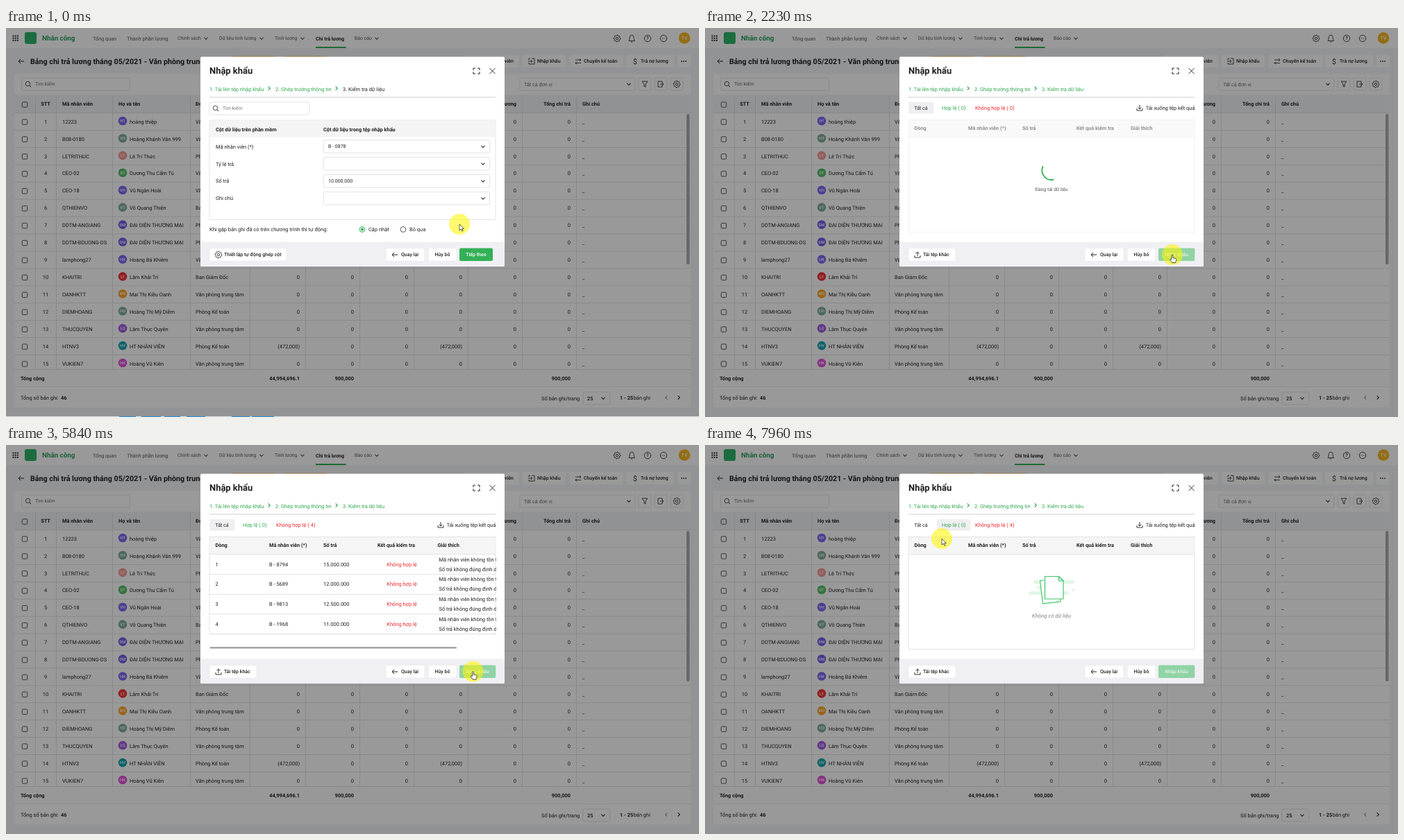
An HTML page that plays this animation: 998x561 px, repeating every 8000 ms.

```html
<!DOCTYPE html>
<html lang="vi">
<head>
<meta charset="utf-8">
<style>
html,body{margin:0;width:100%;height:100%;overflow:hidden;background:#fff}
svg{display:block;width:998px;height:561px}
text{font-family:Roboto,"Noto Sans",sans-serif;text-rendering:geometricPrecision;white-space:pre}
</style>
</head>
<body>
<svg id="stage" viewBox="0 0 998 561" xmlns="http://www.w3.org/2000/svg"></svg>
<script>
const INK = '#212121', GREEN = '#2fa84f', RED = '#f0282d', LINE = '#dcdcde';

// y is the vertical middle of the capitals
const text = (x, y, s, o = {}) => {
  const { size = 7.48, w = 400, fill = INK, anchor = 'start', extra = '' } = o;
  return `<text x="${x}" y="${(y + size * .355).toFixed(2)}" font-size="${size}" font-weight="${w}" fill="${fill}" text-anchor="${anchor}" ${extra}>${s}</text>`;
};
const bold = (x, y, s, o = {}) => text(x, y, s, { w: 700, size: 7.36, ...o });
const rect = (x, y, w, h, fill, o = '') => `<rect x="${x}" y="${y}" width="${w}" height="${h}" fill="${fill}" ${o}/>`;
const box = (x, y, w, h, stroke = LINE, fill = '#fff') => rect(x, y, w, h, fill, `rx="1.5" stroke="${stroke}" stroke-width=".8"`);
const path = (d, stroke = '#333', w = .9, fill = 'none') => `<path d="${d}" fill="${fill}" stroke="${stroke}" stroke-width="${w}" stroke-linejoin="round"/>`;
const circle = (x, y, r, fill = 'none', stroke = 'none', w = .9, o = '') => `<circle cx="${x}" cy="${y}" r="${r}" fill="${fill}" stroke="${stroke}" stroke-width="${w}" ${o}/>`;
const group = (id, body, o = '') => `<g id="${id}" ${o}>${body}</g>`;

const chevron = (x, y, c = '#333') => path(`M${x - 2.6} ${y - 1.3}l2.6 2.6 2.6-2.6`, c, 1.1);
const chevronRight = (x, y, c = '#333', s = 1) => path(`M${x - 1.3 * s} ${y - 2.6}l${2.6 * s} 2.6 ${-2.6 * s} 2.6`, c, 1.1);
const arrowLeft = (x, y) => path(`M${x + 4} ${y}h-8m3.2-3.2l-3.2 3.2 3.2 3.2`, '#222', 1);
const search = (x, y) => circle(x - .6, y - .6, 3.2, 'none', '#333') + path(`M${x + 1.8} ${y + 1.8}l2.4 2.4`, '#333', 1);
const gear = (x, y) => {
  const pts = Array.from({ length: 32 }, (_, i) => {
    const r = i % 4 < 2 ? 5 : 3.9, a = i * Math.PI / 16;
    return (x + r * Math.cos(a)).toFixed(1) + ' ' + (y + r * Math.sin(a)).toFixed(1);
  });
  return path('M' + pts.join('L') + 'Z') + circle(x, y, 1.7, 'none', '#333');
};
const tray = (x, y, dir) => path(`M${x - 4} ${y + 1}v3h8v-3M${x} ${y + 2}v-6` +
  (dir > 0 ? 'm-2.4 3.6l2.4 2.4 2.4-2.4' : 'm-2.4 2.4l2.4-2.4 2.4 2.4'), '#333', 1);

function header() {
  let s = rect(0, 0, 998, 29, '#fff');
  for (let i = 0; i < 9; i++) s += rect(9.5 + i % 3 * 3.2, 10.5 + (i / 3 | 0) * 3.2, 2, 2, '#333');
  s += rect(27, 6, 17, 17, '#2fb36b', 'rx="3"') + bold(52, 14.5, 'Nhân công', { size: 9.8, fill: '#2a9d5c' });
  s += text(125, 15, 'Tổng quan', { size: 7.3, fill: '#555' }) + text(174, 15, 'Thành phần lương', { size: 7.4, fill: '#555' });
  [[247, 'Chính sách', 288], [307, 'Dữ liệu tính lương', 368], [387, 'Tính lương', 427], [502, 'Báo cáo', 534]]
    .forEach(([x, label, c]) => s += text(x, 15, label, { size: 6.85, fill: '#555' }) + chevron(c, 15, '#555'));
  s += bold(446, 15, 'Chi trả lương', { size: 7.1 }) + rect(446, 27, 43.5, 2, '#2fb053');
  s += gear(880, 15) + path('M897 18.5h8.4c-1.4-1.5-1-4.4-1.4-6q-.6-2.3-2.8-2.3t-2.8 2.3c-.4 1.6 0 4.5-1.4 6ZM900 19.8q1.2 1 2.4 0');
  s += circle(924, 15, 4.7, 'none', '#333') + text(924, 15, '?', { size: 7, anchor: 'middle', w: 500 });
  s += circle(947, 15, 4.7, 'none', '#333');
  for (const d of [-2, 0, 2]) s += circle(947 + d, 15, .6, '#333');
  return s + circle(977, 14.5, 8.3, '#f5b51c') + text(977, 14.7, 'TV', { size: 7, anchor: 'middle', fill: '#fff', w: 500 });
}

function titleBar() {
  let s = arrowLeft(22, 48) + bold(35, 48, 'Bảng chi trả lương tháng 05/2021 - Văn phòng trung tâm', { size: 10.7 });
  s += rect(325, 40.4, 64, 16, '#ffc670', 'rx="2"') + rect(399, 40.4, 64, 16, '#ffc670', 'rx="2"');
  [[660, 79], [744, 62], [812, 77], [893, 69], [967, 19]].forEach(([x, w]) => s += rect(x, 39, w, 18, '#fff', 'rx="2"'));
  const label = (x, t, o) => text(x, 48, t, { size: 7, w: 500, ...o });
  s += label(731, 'Thêm nhân viên', { anchor: 'end' }) + label(765, 'Nhập khẩu') + label(832, 'Chuyển kế toán') + label(914, 'Trả nợ lương');
  s += path('M757 44h4v8h-8v-2m0-4v-2h2m-3 4h6m-2-2l2 2-2 2');
  s += path('M820 46h8m-2-2l2 2-2 2M828 50.5h-8m2-2l-2 2 2 2');
  s += text(906, 48, '$', { size: 10.5, anchor: 'middle', fill: '#333' });
  for (const d of [-3, 0, 3]) s += circle(976 + d, 48, .9, '#333');
  return s;
}

function toolbar() {
  const icons = path('M916 77h8l-3 4v4l-2-1v-3Z') + path('M945 80v-3h-6v8h6v-3m-3-1h5m-2-2l2 2-2 2') + gear(966, 81);
  return rect(12, 66, 974, 30, '#fff') + box(22.5, 72, 156, 18) + search(32, 81) + text(42, 81, 'Tìm kiếm', { fill: '#666', size: 6.9 }) +
    box(740, 72, 166, 18) + text(746, 81, 'Tất cả đơn vị', { fill: '#666', size: 7.2 }) + chevron(897, 81) +
    [911, 934, 957].map(x => box(x, 72, 18, 18)).join('') + icons;
}

const HQ = 'Văn phòng trung tâm', ACC = 'Phòng Kế toán', BOARD = 'Ban Giám Đốc', SALES = 'Phòng Kinh doanh';
const PURPLE = '#7a68f0', SAGE = '#80ad98';
const staff = [
  ['12223', 'HT', PURPLE, 'hoàng thiệp', HQ],
  ['B08-0180', 'H9', SAGE, 'Hoàng Khánh Vân 999', HQ],
  ['LETRITHUC', 'LT', '#f59a95', 'Lê Trí Thức', SALES],
  ['CEO-02', 'DT', '#55bf68', 'Dương Thu Cẩm Tú', HQ],
  ['CEO-18', 'VH', PURPLE, 'Vũ Ngân Hoài', HQ],
  ['QTHIENVO', 'VT', SAGE, 'Võ Quang Thiện', BOARD],
  ['DDTM-ANGIANG', 'DM', '#705fe8', 'ĐẠI DIỆN THƯƠNG MẠI', SALES],
  ['DDTM-BDUONG-DS', 'DM', '#705fe8', 'ĐẠI DIỆN THƯƠNG MẠI', SALES],
  ['lamphong27', 'HK', PURPLE, 'Hoàng Bá Khiêm', HQ],
  ['KHAITRI', 'LT', '#f03438', 'Lâm Khải Trí', BOARD],
  ['OANHKTT', 'MO', '#fda324', 'Mai Thị Kiều Oanh', HQ],
  ['DIEMHOANG', 'HD', SAGE, 'Hoàng Thị Mỹ Diễm', ACC],
  ['THUCQUYEN', 'LQ', '#a25ce0', 'Lâm Thục Quyên', HQ],
  ['HTNV3', 'HV', '#14a3ac', 'HT NHÂN VIÊN', ACC],
  ['VUKIEN7', 'HK', '#e050dc', 'Hoàng Vũ Kiên', HQ]
];
const numberEnds = [423, 501, 579, 657, 735, 813];

function grid() {
  const end = { anchor: 'end' }, check = y => rect(23.3, y - 3.7, 7.4, 7.4, 'none', 'rx="1.4" stroke="#444" stroke-width=".9"');
  let s = rect(12, 97, 974, 396, '#fff') + rect(12, 97, 974, 25.5, '#f1f2f4');
  s += check(110.5) + bold(57, 109.5, 'STT', { anchor: 'middle' });
  [[81, 'Mã nhân viên'], [162, 'Họ và tên'], [273, 'Đơn vị'], [830, 'Ghi chú']].forEach(([x, t]) => s += bold(x, 109.5, t));
  s += bold(735, 109.5, 'Trả lương', end) + bold(813, 109.5, 'Tổng chi trả', end);
  staff.forEach(([code, initials, color, name, unit], i) => {
    const y = 135 + i * 24.93;
    s += rect(12, (y - 12.9).toFixed(1), 974, .8, LINE) + check(y + .5) + text(57, y, i + 1, { anchor: 'middle' }) + text(81, y, code);
    s += circle(168, y - 1, 6.3, color) + text(168, y - .9, initials, { size: 5.8, w: 500, fill: '#fff', anchor: 'middle' });
    s += text(178, y, name) + text(273, y, unit);
    numberEnds.forEach((x, k) => s += text(x, y, i === 13 && k % 3 === 0 && k < 4 ? '(472,000)' : '0', end));
    s += text(830, y, '_');
  });
  for (const x of [42, 72, 153, 265, 351, 431, 509, 587, 665, 743, 821]) s += rect(x, 97, .8, 396, LINE);
  s += rect(980, 124, 4.5, 217, '#acacae', 'rx="2"');
  s += rect(12, 492.5, 974, 25.5, '#fcfcfc') + rect(12, 492, 974, .8, LINE) + rect(12, 517.5, 974, .8, LINE) + rect(12, 518, 974, 29, '#fff');
  s += bold(21, 505, 'Tổng cộng') + bold(423, 505, '44,994,696.1', end) + bold(501, 505, '900,000', end) + bold(813, 505, '900,000', end);
  s += text(21, 533.5, 'Tổng số bản ghi:') + bold(79, 533.5, '46') + text(771, 534, 'Số bản ghi/trang') + box(831, 525, 39, 18);
  s += text(837, 534, '25', { w: 500 }) + chevron(860, 534) + bold(884, 533.5, '1 - 25') + text(928, 533.5, 'bản ghi', end);
  return s + chevronRight(951, 533, '#999', -1) + chevronRight(969, 533);
}

const button = (x, w, label, tx) => rect(x, 317.7, w, 18.4, '#fff', 'rx="2" stroke="#e6e6e9" stroke-width=".6"') + text(tx, 327, label, { size: 7, w: 500 });

function modalFrame() {
  return rect(280, 41.5, 438, 302.5, '#fff', 'rx="2"') + rect(280, 308.5, 438, 35.5, '#f0f0f4', 'rx="2"') +
    bold(293, 61.5, 'Nhập khẩu', { size: 12.95 }) +
    path('M676 58h-3v3m6-3h3v3m0 2v3h-3m-3 0h-3v-3', '#333', 1.1) + path('M696.5 58l8 8m0-8l-8 8', '#333', 1) +
    text(293, 88, '1. Tải lên tệp nhập khẩu', { fill: GREEN }) + chevronRight(379, 87, GREEN) +
    text(388, 88, '2. Ghép trường thông tin', { fill: GREEN }) + chevronRight(476, 87, GREEN) +
    text(485, 88, '3. Kiểm tra dữ liệu', { extra: 'id="step3"' }) + rect(293, 99.5, 412, .8, '#c4c4c6') +
    button(547, 56, 'Quay lại', 569) + arrowLeft(560, 327) + button(608, 41, 'Hủy bỏ', 617.5);
}

function mapping() {
  let s = box(293, 107, 144, 18) + search(302, 116) + text(312, 116, 'Tìm kiếm', { fill: '#777', size: 6.9 });
  s += box(293, 133, 412, 143.5) + rect(293.4, 133.4, 411.2, 24, '#f4f4f5');
  s += bold(302, 146, 'Cột dữ liệu trên phần mềm') + bold(457, 146, 'Cột dữ liệu trong tệp nhập khẩu');
  [['Mã nhân viên (*)', 'B - 0878'], ['Tỷ lệ trả', ''], ['Số trả', '10.000.000'], ['Ghi chú', '']].forEach(([name, value], i) => {
    const y = 171 + i * 24.9;
    s += text(302, y, name) + box(457.5, y - 9.4, 239, 18.5) + text(464, y, value, { size: 7 }) + chevron(687, y);
  });
  s += text(293, 290, 'Khi gặp bản ghi đã có trên chương trình thì tự động:');
  s += circle(513, 290.5, 3.9, '#fff', '#2fb053', 1) + circle(513, 290.5, 2.1, '#2fb053') + text(522, 290, 'Cập nhật');
  s += circle(572, 290.5, 3.9, '#fff', '#444') + text(581, 290, 'Bỏ qua');
  s += button(293, 111, 'Thiết lập tự động ghép cột', 314) + gear(306, 327);
  return s + rect(653, 317.5, 48, 18.6, '#34b057', 'rx="2" id="next"') + text(677, 327, 'Tiếp theo', { size: 7, w: 500, fill: '#fff', anchor: 'middle' });
}

const rowTop = i => 158 + i * 28.6;

function dataRows() {
  let s = rect(293.4, 0, 412, 28.6, '#e8f8f3', 'id="hover"');
  [['8794', '15'], ['5689', '12'], ['9813', '12.5'], ['1968', '11']].forEach(([code, amount], i) => {
    const y = rowTop(i) + 14.1, [whole, part = ''] = amount.split('.');
    s += text(301.5, y, i + 1) + text(379, y, 'B - ' + code) + text(457, y, `${whole}.${part.padEnd(3, '0')}.000`);
    s += text(570, y, 'Không hợp lệ', { fill: RED, anchor: 'middle' });
    s += text(623.5, y - 7, 'Mã nhân viên không tồn tại') + text(623.5, y + 7, 'Số trả không đúng định dạng');
    s += rect(293, rowTop(i + 1) - .4, 412, .8, LINE);
  });
  return s;
}

function emptyState() {
  const soft = (x, y, w) => rect(x, y, w, 5, '#e3f6e8', 'rx="2.5"');
  return soft(473, 195, 59) + soft(466, 211, 58) + soft(478, 203, 36) + circle(530, 209, 2, '#e3f6e8') +
    path('M488 195l-5.5 .8 4 33 25.5-3-.4-4', '#3fc66b', 1.2, '#fff') +
    path('M489.5 189.5h20l6.5 6.5v26h-26.5Z', '#3fc66b', 1.2, '#fff') + path('M509.5 189.5v6.5h6.5Z', '#3fc66b', 1.1, '#d9f3e1') +
    text(499, 246.5, 'Không có dữ liệu', { size: 7.7, fill: '#9a9a9e', w: 500, anchor: 'middle', extra: 'font-style="italic"' });
}

function results() {
  const r = 13.6, a = 65 * Math.PI / 180, c = r * Math.cos(a), d = r * Math.sin(a);
  let s = rect(293, 107, 36.5, 16.5, '#efeff2', 'rx="2" id="pill"') + text(311, 115.5, 'Tất cả', { anchor: 'middle', size: 7.1 });
  s += text(341, 115, 'Hợp lệ ( 0)', { fill: GREEN }) + text(389, 115, 'Không hợp lệ ( 0)', { fill: RED, extra: 'id="invalid"' });
  s += tray(626, 115, 1) + text(705.5, 115, 'Tải xuống tệp kết quả', { anchor: 'end' });
  s += rect(293, 132.5, 412, 140, '#fff', `stroke="${LINE}" stroke-width=".8" id="frame"`);
  const heads = [[301.5, 'Dòng'], [379, 'Mã nhân viên (*)'], [457, 'Số trả'], [535, 'Kết quả kiểm tra']].map(([x, t]) => bold(x, 144.5, t)).join('');
  s += group('heads', rect(293.4, 133, 411.2, 24.5, '#f5f5f6') + rect(293, 157.3, 412, .8, LINE) + heads + bold(613, 144.5, 'Giải thích', { extra: 'id="reason"' }));
  s += group('rows', dataRows() + rect(699.5, 159, 5, 6, '#a0a0a2', 'rx="2" id="thumb"') + rect(293.5, 291.3, 355.5, 2.3, '#9b9b9d', 'rx="1" id="scroll"'), 'clip-path="url(#tableClip)"');
  s += group('loading', `<path id="spinner" d="M${c} ${-d}A${r} ${r} 0 0 1 ${c} ${d}" fill="none" stroke="#2fb053" stroke-width="1.8"/>` +
    text(499, 233, 'Đang tải dữ liệu', { fill: '#555', size: 6.8, anchor: 'middle' }));
  s += group('empty', emptyState());
  s += button(293, 68, 'Tải tệp khác', 314) + tray(306, 327, -1);
  return s + rect(653, 317.5, 52.3, 18.6, '#90d3a5', 'rx="2"') + text(679, 327, 'Nhập khẩu', { size: 7, w: 500, fill: '#e2f4e8', anchor: 'middle' });
}

const taskbar = [[163, 24], [195, 28], [228, 23], [260, 27], [325, 26], [354, 32]].map(([x, w]) => rect(x, 560, w, 1, '#2a8fd8')).join('');

document.getElementById('stage').innerHTML =
  '<defs><clipPath id="tableClip"><rect x="293" y="132" width="412.6" height="165"/></clipPath></defs>' +
  rect(0, 0, 998, 561, '#f3f4f6') + header() + titleBar() + toolbar() + grid() +
  rect(0, 0, 998, 561, '#000', 'opacity=".4"') + group('taskbar', rect(0, 560, 998, 1, '#dfe3e6') + taskbar) +
  modalFrame() + group('mapping', mapping()) + group('results', results()) +
  group('pointer', circle(0, 0, 15, '#fff400', 'none', 0, 'opacity=".57"') +
    group('arrow', path('M0 0V9L2.2 7 3.7 10.2 5.1 9.6 3.7 6.5H6.4Z', '#222', .7, '#fff')) +
    group('hand', path('M-1 7V1a1 1 0 0 1 2 0V4.6L4.8 5.5Q6 6 5.7 7.6L4.7 11.5H-.5L-3.3 7.8Q-3.6 6.3-2.2 6.5Z', '#222', .8, '#fff')));

const el = Object.fromEntries([...document.querySelectorAll('[id]')].map(e => [e.id, e]));
const set = (id, name, value) => el[id].setAttribute(name, value);
const show = (id, on) => set(id, 'display', on ? 'inline' : 'none');

const moves = [
  { from: 400, to: 1000, a: [653, 283], b: [673, 327] },
  { from: 5820, to: 6650, a: [673, 327], b: [360, 115.5], bend: [552, 205] },
  { from: 7810, to: 7960, a: [360, 115.5], b: [341, 135] }
];
function pointerAt(t) {
  const m = moves.filter(v => t >= v.from).pop();
  if (!m) return moves[0].a;
  const u = Math.min(1, (t - m.from) / (m.to - m.from)), k = u * u * (3 - 2 * u);
  return m.a.map((a, i) => {
    const mid = m.bend ? m.bend[i] : (a + m.b[i]) / 2;
    return a * (1 - k) ** 2 + 2 * mid * k * (1 - k) + m.b[i] * k * k;
  });
}

function draw(t) {
  const within = (a, b) => t >= a && t < b;
  const checking = t >= 1530, filtered = t >= 7150;
  const loading = within(1610, 3920) || within(7150, 7230);
  const preview = within(1530, 1610), rows = preview || within(3960, 7150);
  const [x, y] = pointerAt(t);

  show('taskbar', t < 1260);
  show('mapping', !checking);
  show('results', checking);
  set('step3', 'fill', checking ? GREEN : INK);
  set('next', 'fill', y > 318 ? '#2c9f4c' : '#34b057');

  set('pill', 'x', filtered ? 334 : 293);
  set('pill', 'width', filtered ? 48.5 : 36.5);
  el.invalid.textContent = `Không hợp lệ ( ${t >= 3920 ? 4 : 0})`;
  set('frame', 'height', rows ? 140 : 162);
  set('frame', 'opacity', loading ? .5 : 1);
  set('heads', 'opacity', loading ? .5 : 1);
  set('reason', 'x', rows ? 621.5 : 613);
  show('rows', rows);
  show('thumb', preview);
  set('scroll', 'width', preview || t < 4030 ? 6 : 355.5);
  show('loading', loading);
  set('spinner', 'transform', `translate(499 205.3) rotate(${(140 + (t - 2230) * .36) % 360})`);
  show('empty', t >= 7230);

  // row highlight trails the pointer slightly
  const [hx, hy] = pointerAt(t - 100), row = Math.floor((hy - rowTop(0)) / 28.6);
  show('hover', t > 5840 && hx < 705 && row >= 0 && row < 4);
  set('hover', 'y', rowTop(row));

  const hand = y > 318 && t < 1530 || within(1530, 7900);
  set('pointer', 'transform', `translate(${x.toFixed(2)} ${y.toFixed(2)})`);
  show('hand', hand);
  show('arrow', !hand);
}

function tick() {
  draw(performance.now() % 8000);
  requestAnimationFrame(tick);
}
tick();
</script>
</body>
</html>
```
